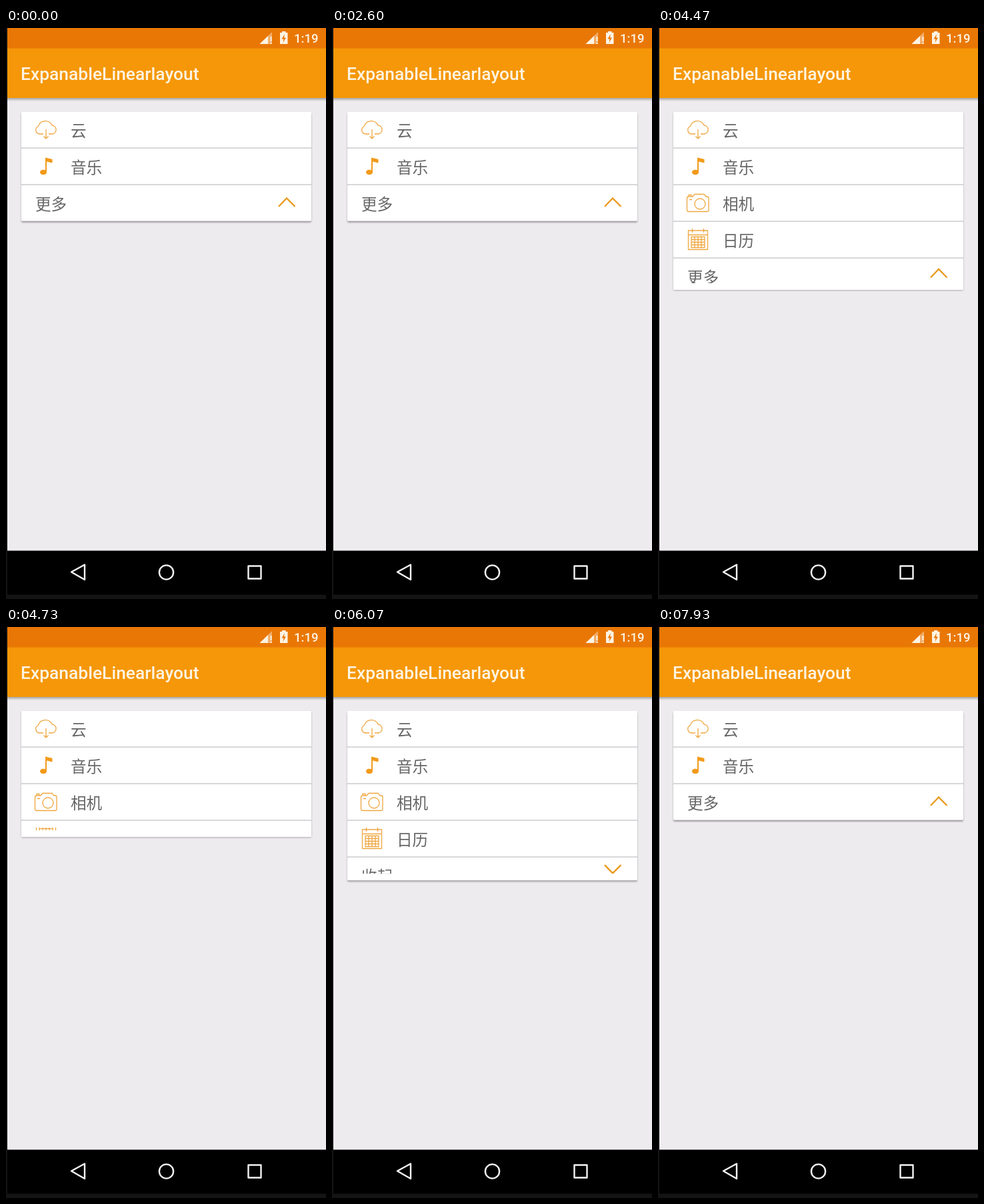
An HTML page that plays this animation: 480 px wide and 857 px high, repeating every 8000 ms.

```html
<!DOCTYPE html>
<html lang="zh-CN">
<head>
<meta charset="utf-8">
<title>ExpanableLinearlayout</title>
<style>
  html, body { margin: 0; width: 100%; height: 100%; overflow: hidden; background: #000; }
  body > svg { display: block; width: 100%; height: 100%; }
  svg svg { overflow: hidden; }
  .latin { font: 500 26.4px Roboto, sans-serif; fill: #fef4e2; }
  .latin.clock { font-size: 18.6px; }
  .label { font: 23.6px "Noto Sans CJK SC", "Noto Sans CJK", sans-serif; fill: #666; }
  .icon { fill: none; stroke: #efa640; stroke-width: 1.3; stroke-linejoin: round; }
  .solid { fill: #f29a1a; stroke: none; }
  .chevron { fill: none; stroke: #e9991c; stroke-width: 2.3; }
  .nav { fill: none; stroke: #f4f4f4; stroke-width: 2.4; stroke-linejoin: round; }
</style>
</head>
<body>
<svg viewBox="0 0 480 857" preserveAspectRatio="none">
  <defs>
    <linearGradient id="fade" x2="0" y2="1">
      <stop stop-color="#000" stop-opacity=".3"/>
      <stop offset="1" stop-color="#000" stop-opacity="0"/>
    </linearGradient>
  </defs>

  <rect width="480" height="857" fill="#141414"/>
  <rect x="2" width="478" height="785" fill="#eeebee"/>
  <rect x="2" y="105" width="478" height="5" fill="url(#fade)"/>
  <rect x="2" y="30" width="478" height="75" fill="#f59708"/>
  <rect x="2" width="478" height="30.5" fill="#e97705"/>
  <rect x="2" y="784.5" width="478" height="66" fill="#000"/>

  <!-- status bar -->
  <path d="M380.5 24L399 6V24Z" fill="#fff" opacity=".4"/>
  <path d="M380.5 24L393 12V24Z" fill="#fdf3e4"/>
  <path d="M397.5 13V20M397.5 22V24" stroke="#fdf3e4" stroke-width="2"/>
  <path d="M411 7H414V5H419.500V7H422.500V24H411Z" fill="#fdf3e4"/>
  <path d="M418 9L413.500 16.500H416.500L415.500 22L420 14.500H417Z" fill="#e97705"/>
  <text class="latin clock" x="432" y="21.5">1:19</text>
  <text class="latin" x="22" y="78">ExpanableLinearlayout</text>

  <!-- card -->
  <rect id="card" x="23" y="126" width="435" rx="2" fill="#d2d2d6"/>
  <g id="rows"></g>

  <!-- navigation bar -->
  <g class="nav">
    <path d="M98 816.500L118 805.500V828Z"/>
    <circle cx="240.500" cy="817" r="10.600"/>
    <rect x="363.500" y="807.500" width="19" height="19"/>
  </g>
</svg>

<script>
const $ = id => document.getElementById(id);
const PITCH = 55, ROW = 54, PAD = 10, TOP = 126, DURATION = 500, LOOP = 8000;

const icons = {
  cloud: '<path d="M33 33H27A6 6 0 0 1 25.5 21.5A11 11 0 0 1 46 20A6.6 6.6 0 0 1 47 33H41"/>' +
         '<path d="M37 26V40M33.5 36.5L37 40L40.5 36.5"/>',
  note: '<g class="solid"><ellipse cx="33" cy="35.5" rx="5" ry="3.8"/>' +
        '<path d="M36 13.500L46.500 16V21.500L38 19.500V36H36Z"/></g>',
  camera: '<path d="M23 17H29L32 13.500H46L49 17H50.500Q53 17 53 19.500V37Q53 39.500 50.500 39.500H23' +
          'Q20.500 39.500 20.500 37V19.500Q20.500 17 23 17Z"/>' +
          '<circle cx="40" cy="28" r="8"/><path d="M24 21.500H28M23 16.500V14.500H27V16.500"/>',
  calendar: '<path d="M22.500 13H51.500V41.500H22.500ZM22.500 19.500H51.500M28.500 10V16M45.500 10V16"/>' +
            '<path d="M27 22.500H47V38.500H27ZM27 26.500H47M27 30.500H47M27 34.500H47M32 22.500V38.500M37 22.500V38.500M42 22.500V38.500"/>'
};

function makeRow(label, icon, x) {
  const html = `<svg x="23" width="435"><rect width="435" height="100%" rx="1" fill="#fff"/>
    <svg y="${PAD}" width="435"><g transform="translate(0 ${-PAD})">
    <text class="label" x="${x}" y="37">${label}</text><g class="shift">${icon}</g></g></svg></svg>`;
  $('rows').insertAdjacentHTML('beforeend', html);
  const el = $('rows').lastElementChild;
  return { el, inner: el.querySelector('svg'), shift: el.querySelector('.shift'), text: el.querySelector('text') };
}

const item = (label, icon) => makeRow(label, `<g class="icon">${icons[icon]}</g>`, 74);
const cloud = item('云', 'cloud');
const music = item('音乐', 'note');
const camera = item('相机', 'camera');
const calendar = item('日历', 'calendar');
const footer = makeRow('更多', '<path class="chevron"/>', 21);
const chevron = footer.shift.firstElementChild;
const all = [cloud, music, camera, calendar, footer];

// Each tap toggles the list: [start, opens]
const taps = [[2700, true], [4390, false], [5710, true], [7080, false]];

function state(t) {
  const [start, open] = taps.filter(tap => tap[0] <= t).pop() || [-DURATION, false];
  const x = Math.min(1, (t - start) / DURATION);
  const eased = (1 - Math.cos(Math.PI * x)) / 2;
  return { open, moving: x < 1, p: open ? eased : 1 - eased };
}

// A squeezed row keeps its text at the top and its icon centred
function placeRow(row, i, space) {
  const h = Math.max(0, Math.min(ROW, space - i * PITCH));
  row.el.style.display = h > 0 ? '' : 'none';
  row.el.setAttribute('y', TOP + i * PITCH);
  row.el.setAttribute('height', Math.min(h, ROW - 0.5));
  row.inner.setAttribute('height', Math.max(0, h - 2 * PAD));
  row.shift.setAttribute('transform', `translate(0 ${(h - ROW) / 2})`);
}

function draw(t) {
  const { open, moving, p } = state(t);
  const space = 3 * PITCH - 1 + 2 * PITCH * p;
  const shown = open || moving ? all : [cloud, music, footer];
  for (const row of all) row.el.style.display = 'none';
  shown.forEach((row, i) => placeRow(row, i, space));
  footer.text.textContent = open ? '收起' : '更多';
  chevron.setAttribute('d', open ? 'M386 21L398 33.500L410.500 21' : 'M386 32L398 19.500L410.500 32');
  $('card').setAttribute('height', space);
  $('card').style.filter = moving && !open
    ? 'drop-shadow(0 1px 1px rgba(0,0,0,.28))'
    : 'drop-shadow(0 2px 1px rgba(0,0,0,.32))';
}

const begin = performance.now();
function frame() {
  draw((performance.now() - begin) % LOOP);
  requestAnimationFrame(frame);
}
frame();
</script>
</body>
</html>
```
